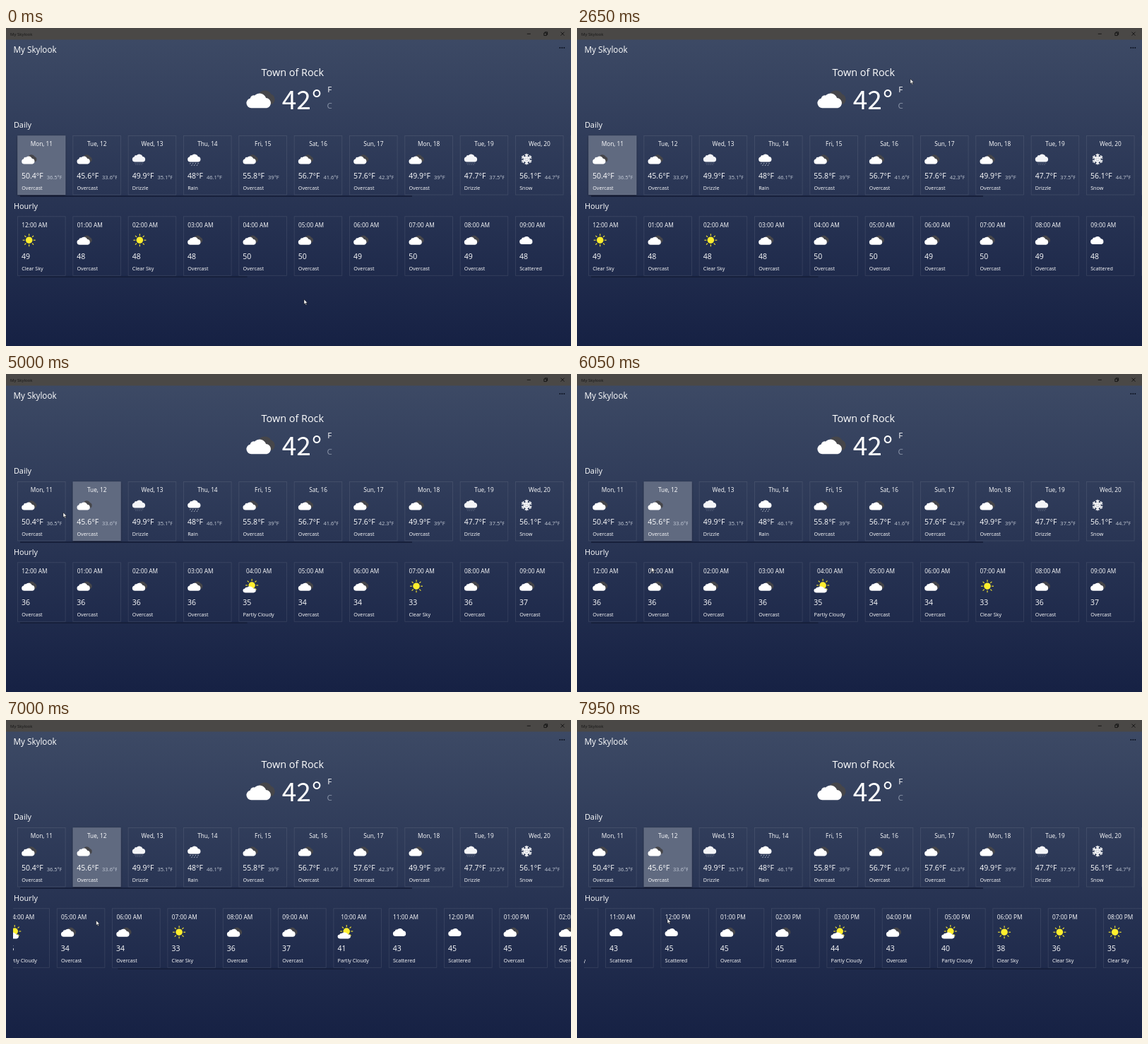
Write an HTML page that moves like this. It is 800x450 px and loops after 8 s.

```html
<!DOCTYPE html>
<html lang="en">
<head>
<meta charset="utf-8">
<title>My Skylook</title>
<style>
  html, body { margin: 0; width: 100%; height: 100%; overflow: hidden; background: #162045; }
  svg { display: block; }
  #stage { width: 800px; height: 450px; }
  text { font-family: "Open Sans", "Noto Sans", sans-serif; fill: #fff; white-space: pre; }
  .label { font-size: 8.3px; }
  .temp { font-size: 10.5px; }
  .low { font-size: 7.5px; fill: #c3cad6; }
  .desc { font-size: 7.2px; }
  .head { font-size: 10.9px; }
  .digits { font: 37px "Noto Sans CJK JP", "Noto Sans CJK SC", "Noto Sans", sans-serif; }
  .card { fill: none; stroke: #fff; stroke-opacity: .11; stroke-width: .8; }
  .bar { stroke: #121a33; stroke-width: 1.3; }
</style>
</head>
<body>
<svg id="stage" viewBox="0 0 800 450">
  <defs>
    <linearGradient id="sky" x1="0" y1="0" x2="0" y2="1">
      <stop offset="0" stop-color="#3e4b66"/>
      <stop offset="1" stop-color="#162144"/>
    </linearGradient>
    <filter id="shade" x="-20%" y="-20%" width="140%" height="140%">
      <feDropShadow dx="0" dy="1" stdDeviation="1.6" flood-color="#000" flood-opacity=".4"/>
    </filter>
    <clipPath id="view"><rect x="10" y="262" width="790" height="100"/></clipPath>

    <!-- Large cloud, 36 wide and 23 high -->
    <path id="puff" d="M7 23a7 7 0 0 1-1.5-13.8a5 5 0 0 1 6.3-4A9.6 9.6 0 0 1 27.8 8.6A7.3 7.3 0 0 1 29 23Z"/>
    <g id="o">
      <path d="M17 8A10 10 0 0 1 35 6.5A8 8 0 0 1 37 20.5L26 21Z" transform="translate(0 -1.5)" fill="#46464a"/>
      <use href="#puff" y="1.8" fill="#fff"/>
    </g>
    <g id="s"><use href="#puff" y=".4" fill="#fff"/></g>
    <g id="d">
      <use href="#puff" y="-3.6" fill="#f4f5f8"/>
      <path d="M7 22.5h23M9 26h19" stroke="#7d869a" stroke-width="1.6" stroke-dasharray="2 3"/>
    </g>
    <g id="r">
      <use href="#puff" y="-3.6" fill="#fff"/>
      <path d="M8 22l-1.5 2.5M15 22l-1.5 2.5M22 22l-1.5 2.5M29 22l-1.5 2.5M12 27l-1.5 2.5M19 27l-1.5 2.5M26 27l-1.5 2.5" stroke="#d3dae5" stroke-width="1.6"/>
    </g>
    <g id="rays"></g>
    <g id="c"><use href="#rays" x="20" y="12.5"/></g>
    <g id="p">
      <use href="#rays" x="24" y="10.2"/>
      <use href="#puff" transform="translate(0 11.4) scale(1 .8)" fill="#fff"/>
    </g>
    <g id="n" stroke="#fff" stroke-width="2.5" fill="none"></g>
  </defs>

  <rect width="800" height="450" fill="url(#sky)"/>
  <rect width="800" height="16.5" fill="#4a4846"/>
  <text x="6" y="10.6" font-size="6" style="fill:#151515">My Skylook</text>
  <g stroke="#111" stroke-width=".9" fill="none">
    <path d="M737.8 8.3h5M785.5 5.7l5 5M790.5 5.7l-5 5"/>
    <path d="M761.8 7h3.6v3.6h-3.6zM763 7V5.8h3.6v3.6h-1.2"/>
  </g>
  <g fill="#0d1220"><circle cx="784.3" cy="28" r="1"/><circle cx="787.3" cy="28" r="1"/><circle cx="790.3" cy="28" r="1"/></g>

  <text x="10.5" y="34.6" font-size="11.7">My Skylook</text>
  <text x="405.8" y="67.8" font-size="14.4" text-anchor="middle">Town of Rock</text>
  <use href="#o" x="340.3" y="88.5"/>
  <text class="digits" x="390.7" y="115.3">42</text>
  <text x="432.6" y="112.6" font-size="35">°</text>
  <text x="455.2" y="91.2" font-size="11.6">F</text>
  <text x="454.4" y="114.2" font-size="11.6" style="fill:#8b95a8">C</text>

  <text class="head" x="10.9" y="141.4">Daily</text>
  <path class="bar" d="M20 238H575"/>
  <rect id="chosen" y="152.5" width="67.6" height="83.5" fill="#616a80" filter="url(#shade)"/>
  <g id="daily"></g>

  <text class="head" x="10.9" y="255.5">Hourly</text>
  <g clip-path="url(#view)">
    <g id="first"></g>
    <g id="second"></g>
  </g>
  <path id="hourBar" class="bar"/>
  <path id="cursor" d="M0 0V6.8L1.5 5.4L2.6 7.9L3.7 7.4L2.6 5H4.8Z" fill="#fff" stroke="#111" stroke-width=".5"/>
</svg>

<script>
const LOOP = 8000, PITCH = 78.33, LEFT = 16.5, CLICK = 4100;
const $ = id => document.getElementById(id);
const times = (n, make) => Array.from({ length: n }, (_, i) => make(i)).join("");
const sky = { o: "Overcast", s: "Scattered", d: "Drizzle", r: "Rain", c: "Clear Sky", p: "Partly Cloudy", n: "Snow" };

$("rays").innerHTML = '<circle r="9" fill="#ffee2e"/>' + times(8, i =>
  `<path d="M0-11.5V-17" stroke="#ffee2e" stroke-width="2" transform="rotate(${i * 45})"/>`);
$("n").innerHTML = times(6, i =>
  `<path d="M0 0V-15M-4.5-13L0-8.5L4.5-13M-4-7.5L0-4L4-7.5" transform="translate(19 12) rotate(${i * 60})"/>`);

const icon = (kind, y) => `<use href="#${kind}" transform="translate(5.6 ${y}) scale(.53)"/>`;
const card = (i, y, body) =>
  `<g transform="translate(${LEFT + i * PITCH} ${y})"><rect class="card" width="67.6" height="83.5"/>${body}</g>`;

const days = "Mon 50.4 36.5 o,Tue 45.6 33.6 o,Wed 49.9 35.1 d,Thu 48 46.1 r,Fri 55.8 39 o,Sat 56.7 41.6 o,Sun 57.6 42.3 o,Mon 49.9 39 o,Tue 47.7 37.5 d,Wed 56.1 44.7 n,Thu 52.3 40 o";
$("daily").innerHTML = days.split(",").map((day, i) => {
  const [name, high, low, kind] = day.split(" ");
  return card(i, 152.5, `<text class="label" x="33.9" y="14.9" text-anchor="middle">${name}, ${11 + i}</text>
    ${icon(kind, 26.8)}
    <svg width="62.3" height="83"><text class="temp" x="5.5" y="60.6">${high}°F<tspan class="low" dx="5" dy=".4">${low}°F</tspan></text></svg>
    <text class="desc" x="5.7" y="76.5">${sky[kind]}</text>`);
}).join("");

const hours = list => list.split(" ").map((item, i) => {
  const kind = item.slice(-1);
  const clock = String(i % 12 || 12).padStart(2, "0") + ":00 " + (i < 12 ? "AM" : "PM");
  return card(i, 266.8, `<text class="label" x="${kind == "p" ? 10.3 : 5.8}" y="14.9">${clock}</text>
    ${icon(kind, 26.8)}
    <text class="temp" x="5.5" y="60.3">${item.slice(0, -1)}</text>
    <text class="desc" x="5.7" y="76.4">${sky[kind]}</text>`);
}).join("");
$("first").innerHTML = hours("49c 48o 48c 48o 50o 50o 49o 50o 49o 48s 49o");
$("second").innerHTML = hours("36o 36o 36o 36o 35p 34o 34o 33c 36o 37o 41p 43s 45s 45o 45o 44p 43o 40p 38c 36c 35c 35c 34c 34c");

const smooth = k => k * k * (3 - 2 * k);
const linear = k => k;

// Interpolates rows of [time, ...values]
function track(rows, t, ease) {
  const i = rows.findIndex(row => row[0] > t);
  if (i < 0) return rows[rows.length - 1].slice(1);
  const a = rows[i - 1], b = rows[i];
  if (!a) return b.slice(1);
  const k = ease((t - a[0]) / (b[0] - a[0]));
  return a.slice(1).map((v, j) => v + (b[j + 1] - v) * k);
}

const pointer = [
  [0, 422, 384], [50, 422, 383], [850, 459, 108], [1450, 459, 108], [1900, 464, 83], [2350, 465, 83],
  [2650, 472, 72], [2800, 490, 61], [3150, 545, 109], [3900, 131, 182], [4300, 131, 182],
  [5000, 81, 196], [5350, 46, 212], [5750, 52, 233], [6200, 124, 287.5], [6500, 126, 287.5],
  [7400, 129, 281], [8000, 128, 281]
];
const scrolling = [[6250, 0], [6500, 111], [7400, 515], [7950, 837], [8000, 866]];

function draw(t) {
  const clicked = t >= CLICK, since = t - CLICK;
  const [scroll] = track(scrolling, t, linear);
  const rise = clicked ? 20 * Math.exp(-since / 72) : 0;
  $("first").style.display = clicked ? "none" : "";
  $("second").style.display = clicked ? "" : "none";
  $("second").setAttribute("opacity", Math.min(1, Math.max(0, since / 120)));
  $("second").setAttribute("transform", `translate(${-scroll} ${rise})`);
  $("chosen").setAttribute("x", LEFT + (clicked ? PITCH : 0));

  const start = 20 + scroll * .412;
  const length = clicked && since < 250 ? 470 : 321.5;
  $("hourBar").setAttribute("d", `M${start} 352.2h${length}`);

  const [x, y] = track(pointer, t, smooth);
  $("cursor").setAttribute("transform", `translate(${x} ${y})`);
}

function tick(now) {
  draw(now % LOOP);
  requestAnimationFrame(tick);
}
draw(0);
requestAnimationFrame(tick);
</script>
</body>
</html>
```
